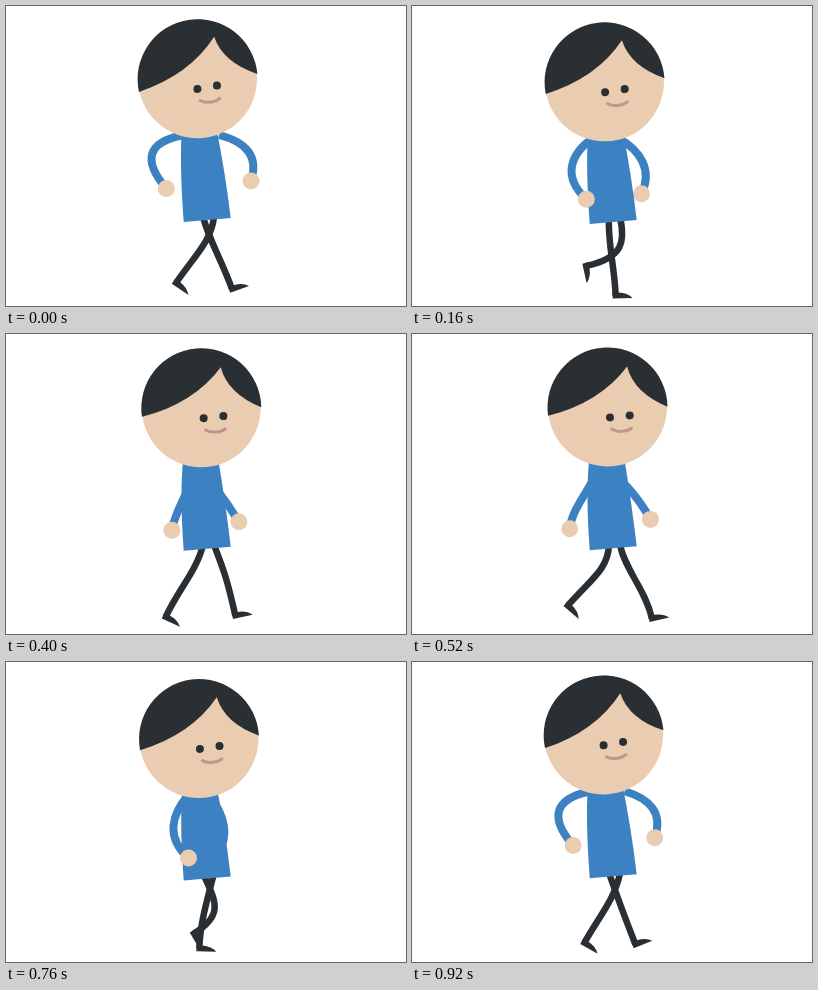
An HTML page with a canvas that plays this animation: 400x300 px, repeating every 960 ms.

```html
<!DOCTYPE html>
<html lang="en">
<head>
<meta charset="utf-8">
<title>Walk cycle</title>
<style>
html, body { margin: 0; width: 100%; height: 100%; overflow: hidden; background: #fff; }
canvas { display: block; }
</style>
</head>
<body>
<canvas id="stage" width="400" height="300"></canvas>
<script>
const ctx = document.getElementById('stage').getContext('2d');
const { sin, cos, PI } = Math;
const LOOP = 960, STEP = 40;
const DARK = '#292f33', SKIN = '#eaccb1', BLUE = '#3c82c3', LIP = '#bf988c';

// Returns a periodic function builder: mid + harmonics of the walk phase
const waveAt = p => (mid, c1, s1 = 0, c2 = 0, s2 = 0, c3 = 0, s3 = 0) =>
  mid + c1 * cos(p) + s1 * sin(p) + c2 * cos(2 * p) + s2 * sin(2 * p) + c3 * cos(3 * p) + s3 * sin(3 * p);

function fill(color, path) {
  ctx.fillStyle = color;
  ctx.fill(new Path2D(path));
}

function disc(x, y, r, color) {
  ctx.fillStyle = color;
  ctx.beginPath();
  ctx.arc(x, y, r, 0, 2 * PI);
  ctx.fill();
}

function limb(x, y, curve, width, color) {
  ctx.strokeStyle = color;
  ctx.lineWidth = width;
  ctx.beginPath();
  ctx.moveTo(x, y);
  ctx.bezierCurveTo(...curve);
  ctx.stroke();
}

// The shin meets the foot at a right angle, so the foot's tilt also bends the knee
function leg(hipX, shiftX, phase) {
  const wave = waveAt(phase);
  const x = shiftX + wave(186, 35, 3, 5);
  const y = wave(278.5, 5.5, 11, 1.5, -3.5, -2.5);
  const tilt = wave(22, -27, -30, -15, 10, 0, 10) * PI / 180;
  const shin = wave(32, 0, -7);
  limb(hipX, 211, [
    hipX + wave(2, 5, -7), 236,
    x + shin * sin(tilt), y - shin * cos(tilt),
    x, y
  ], 6.5, DARK);
  ctx.save();
  ctx.translate(x, y);
  ctx.rotate(tilt);
  fill(DARK, 'M-3 3H17Q12 -2.5 3 -3H-3Z');
  ctx.restore();
}

function arm(x, y, curve) {
  limb(x, y, curve, 8, BLUE);
  disc(curve[4], curve[5], 8.5, SKIN);
}

function head(x, y, sway) {
  ctx.save();
  ctx.translate(x, y);
  ctx.rotate(-2.15 * sway * PI / 180);
  disc(0, 0, 59.5, SKIN);
  fill(DARK, 'M-59 11A60 60 0 1 1 60 -2.5Q26 -15 18.2 -41.2Q-7.6 -4 -59 11Z');
  ctx.translate(-0.8 - 1.7 * sway, 0);
  disc(2.1, 10.3, 4, DARK);
  disc(21.7, 7.6, 4, DARK);
  ctx.lineCap = 'round';
  limb(4.4, 22, [9.5, 25, 19, 24.5, 24, 20.4], 3, LIP);
  ctx.lineCap = 'butt';
  ctx.restore();
}

function draw(t) {
  const phase = 2 * PI * t / LOOP, wave = waveAt(phase);
  const sway = cos(phase), bounce = 1 - cos(2 * phase);
  const bob = 2.1 * bounce, hem = 1.4 * bounce, lean = -0.8 * sway;

  ctx.clearRect(0, 0, 400, 300);
  arm(wave(200, 13), 129 + bob, [
    wave(211, 28, 4, 1), wave(146, -7, 0, -3),
    wave(212, 47, 3, -6), wave(166, -10, 0, -6),
    wave(203, 44, 4, -2), wave(189.5, -9.9, 1, -4.6)
  ]);
  leg(208, wave(14, 0, -4), phase + PI);
  leg(197, 0, phase);
  fill(BLUE, `M${176.5 + lean} ${124 + bob}Q173.5 160 177.7 ${216 + hem}L224.7 ${212 + hem}Q219 165 ${211.5 + lean} ${124 + bob}Z`);
  arm(wave(184, -6), 129 + bob, [
    wave(175, -35), wave(147, -4, 0, -7),
    wave(176, -45, 0, 6), wave(167, -2, 0, -10),
    wave(196.3, -40, 0, 4), wave(190.3, -1, 0, -6.8)
  ]);
  head(193.5 - 2 * sway, 72.7 + bob, sway);
}

function tick() {
  draw(Math.floor(performance.now() % LOOP / STEP) * STEP);
  requestAnimationFrame(tick);
}
tick();
</script>
</body>
</html>
```
